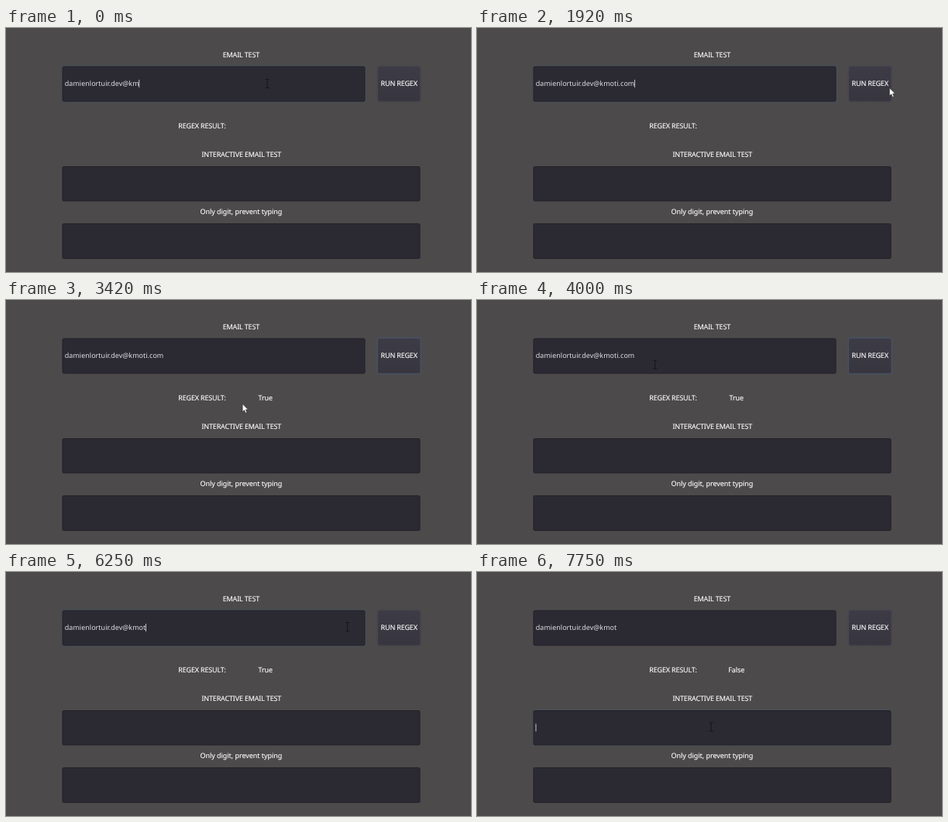
Recreate the animation shown at these times as an HTML page. Size 600 by 316 pixels, loop 8 s.

```html
<!DOCTYPE html>
<html lang="en">
<head>
<meta charset="utf-8">
<title>Regex form</title>
<style>
  html, body { margin: 0; width: 100%; height: 100%; overflow: hidden; background: #4c4a4b; }
  svg { display: block; width: 600px; height: 316px; }
  text {
    font: 9px "Noto Sans", "Open Sans", sans-serif;
    fill: #fff;
    stroke: #fff;
    stroke-width: .12px;
    letter-spacing: -.18px;
    text-rendering: geometricPrecision;
  }
  .mid { text-anchor: middle; }
  .mixed { letter-spacing: -.05px; }
  #mail { fill: #e0dfe3; stroke: none; letter-spacing: .01px; }
  .field { fill: #2b2932; stroke: #232128; }
  .ring { fill: none; stroke: #45555f; }
  #edge { fill: none; }
</style>
</head>
<body>
<svg viewBox="0 0 600 316">
  <defs>
    <linearGradient id="normal" x2="0" y2="1">
      <stop offset="0" stop-color="#3d3b45"/><stop offset="1" stop-color="#37353e"/>
    </linearGradient>
    <linearGradient id="pressed" x2="0" y2="1">
      <stop offset="0" stop-color="#121117"/><stop offset="1" stop-color="#38353f"/>
    </linearGradient>
  </defs>

  <rect class="ring" id="ring1" x="72.3" y="49" width="391.7" height="47" rx="2"/>
  <rect class="ring" id="ring2" x="72.3" y="178.7" width="462.4" height="46" rx="2"/>
  <rect class="field" x="73" y="50" width="390" height="45" rx="1.5"/>
  <rect class="field" x="73" y="179.5" width="461" height="44.5" rx="1.5"/>
  <rect class="field" x="73" y="253.5" width="461" height="45" rx="1.5"/>

  <rect id="edge" x="479" y="49" width="56.3" height="46.7" rx="3"/>
  <rect id="button" x="480" y="50" width="54.3" height="44.7" rx="2"/>

  <text class="mid" x="303.4" y="38">EMAIL TEST</text>
  <text class="mid" x="507.2" y="75">RUN REGEX</text>
  <text x="222.3" y="130.3">REGEX RESULT:</text>
  <text class="mid mixed" id="result" x="334.8" y="130.3"></text>
  <text class="mid" x="303.8" y="167.3">INTERACTIVE EMAIL TEST</text>
  <text class="mid mixed" x="303.4" y="241.3">Only digit, prevent typing</text>
  <text id="mail" x="75.8" y="75"></text>
  <rect id="caret" width="1" height="10" fill="#c4c3c8"/>

  <path id="arrow" d="M0 0V10.2L2.4 8.1L4 11.8L5.8 11L4.2 7.4H7.3Z" fill="#fff" stroke="#222" stroke-width=".6"/>
  <path id="beam" d="M-2.5 -5.5H2.5M0 -5.5V5.5M-2.5 5.5H2.5" fill="none" stroke="#141318" stroke-width=".9"/>
</svg>
<script>
const LOOP = 8000;
const TICK = 1000 / 12;
const ADDRESS = "damienlortuir.dev@kmoti.com";
const $ = id => document.getElementById(id);

// Moments of each key press, in ms
const typed = [80, 170, 330, 500, 580, 670, 750];
const erased = [4830, 5000, 5170, 5250, 5420];

const clicks = [
  { at: 2330, hold: 90, target: "button", answer: "True" },
  { at: 4170, hold: 90, target: "mail" },
  { at: 6420, hold: 80, target: "button", answer: "False" },
  { at: 7670, hold: 80, target: "second" }
];

// Pointer moves: a smooth curve through evenly timed points
const moves = [
  { from: 0, to: 1, path: [[337, 72], [337, 72]] },
  { from: 1417, to: 2083, path: [[490, 66], [558, 62], [540, 77], [509, 75]] },
  { from: 3083, to: 4100, path: [[500, 80], [303, 135], [167, 142], [256, 64]] },
  { from: 6083, to: 6417, path: [[290, 65], [440, 71], [505, 73]] },
  { from: 6750, to: 7580, path: [[480, 82], [363, 124], [291, 198], [286, 221], [297, 208], [302, 200.5]] }
];

const count = (times, t) => times.filter(at => at <= t).length;
const show = (el, on) => el.setAttribute("visibility", on ? "visible" : "hidden");
const inside = (x, y, l, t, r, b) => x >= l && x <= r && y >= t && y <= b;

// Catmull-Rom curve, u from 0 to 1
function curve(path, u) {
  const end = path.length - 1;
  const i = Math.min(end - 1, Math.floor(u * end));
  const s = u * end - i;
  const at = k => path[Math.max(0, Math.min(end, k))];
  const [a, b, c, d] = [at(i - 1), at(i), at(i + 1), at(i + 2)];
  return [0, 1].map(n => b[n] + s / 2 * (c[n] - a[n]
    + s * (2 * a[n] - 5 * b[n] + 4 * c[n] - d[n] + s * (3 * (b[n] - c[n]) + d[n] - a[n]))));
}

function pointer(t) {
  const now = Math.floor((t + 5) / TICK) * TICK + 1;
  const { from, to, path } = moves.filter(m => m.from <= now).pop();
  return curve(path, Math.min(1, (now - from) / (to - from)));
}

function drawPointer(x, y) {
  const overField = inside(x, y, 72, 49, 464, 96) || inside(x, y, 72, 179, 535, 225);
  const shape = overField ? $("beam") : $("arrow");
  shape.setAttribute("transform", `translate(${x} ${y})`);
  show($("beam"), overField);
  show($("arrow"), !overField);
}

function drawButton(focused, down) {
  $("button").setAttribute("fill", `url(#${down ? "pressed" : "normal"})`);
  $("edge").setAttribute("stroke", focused ? (down ? "#56606c" : "#415472") : "#46434e");
}

function drawCaret(active) {
  const second = active === "second";
  show($("caret"), active !== "button");
  $("caret").setAttribute("x", second ? 75.5 : 75.5 + $("mail").getComputedTextLength());
  $("caret").setAttribute("y", second ? 196.5 : 67);
}

function draw(t) {
  const click = clicks.filter(c => c.at <= t).pop();
  const active = click ? click.target : "mail";
  const answered = clicks.filter(c => c.answer && c.at + c.hold <= t).pop();
  $("mail").textContent = ADDRESS.slice(0, 20 + count(typed, t) - count(erased, t));
  $("result").textContent = answered ? answered.answer : "";
  show($("ring1"), active === "mail");
  show($("ring2"), active === "second");
  drawButton(active === "button", active === "button" && t < click.at + click.hold);
  drawCaret(active);
  drawPointer(...pointer(t));
}

function tick() {
  draw(performance.now() % LOOP);
  requestAnimationFrame(tick);
}
tick();
</script>
</body>
</html>
```
